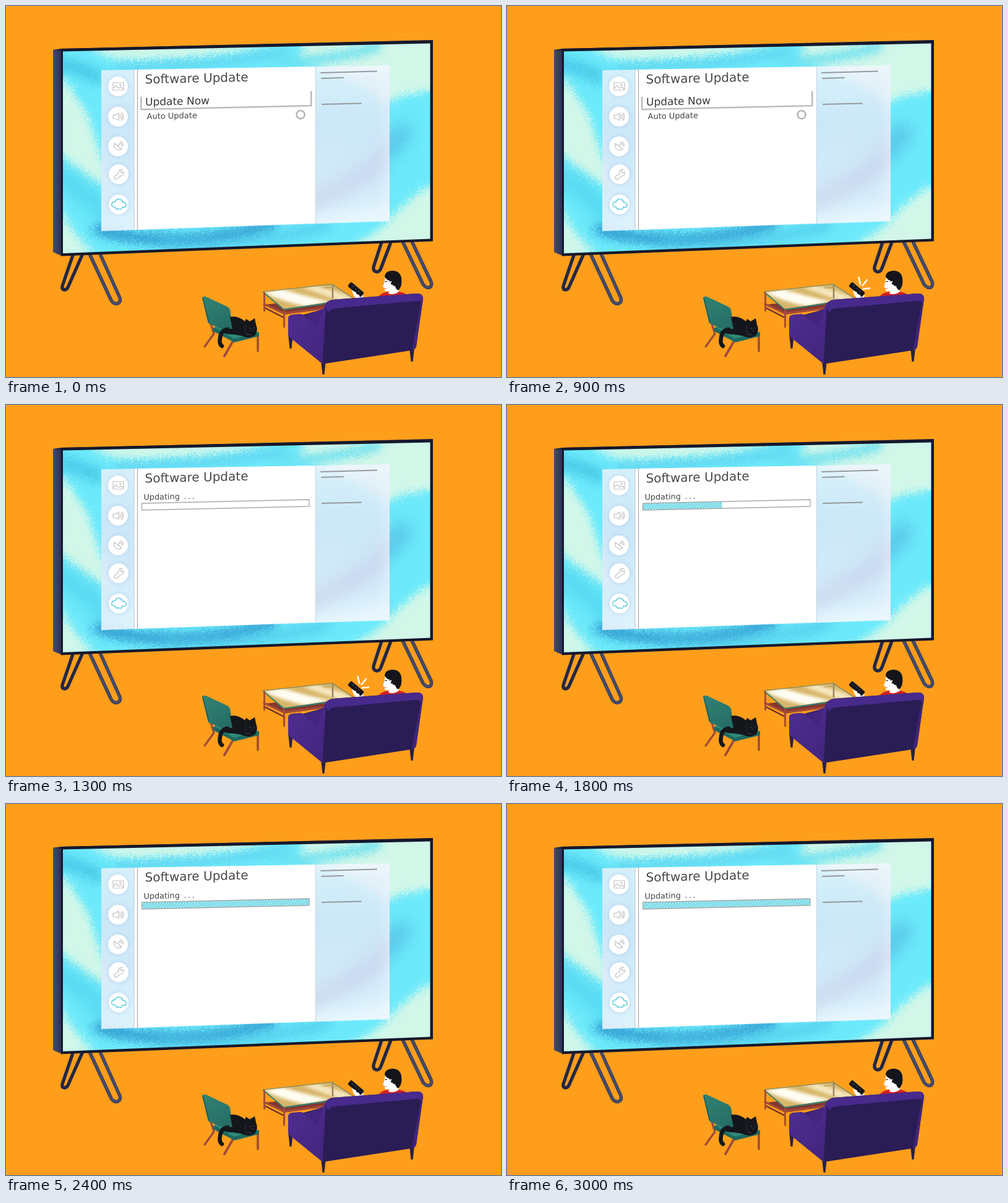
Write an HTML page with a canvas that moves like this. It is 800 by 600 pixels and loops after 3200 ms.

```html
<!DOCTYPE html>
<html lang="en">
<head>
<meta charset="utf-8">
<title>Software Update</title>
<style>
html, body { margin: 0; width: 100%; height: 100%; overflow: hidden; background: #ff9e1b; }
canvas { display: block; width: 800px; height: 600px; }
</style>
</head>
<body>
<canvas id="stage" width="800" height="600"></canvas>
<script>
const W = 800, H = 600, LOOP = 3200;
const stage = document.getElementById('stage').getContext('2d');

function layer() {
  const c = document.createElement('canvas');
  c.width = W;
  c.height = H;
  return c.getContext('2d', { willReadFrequently: true });
}

function fill(g, d, color) {
  g.fillStyle = color;
  g.fill(new Path2D(d));
}

function line(g, d, color, width = 1) {
  g.strokeStyle = color;
  g.lineWidth = width;
  g.lineCap = g.lineJoin = 'round';
  g.stroke(new Path2D(d));
}

function ramp(g, x1, y1, x2, y2, ...colors) {
  const r = g.createLinearGradient(x1, y1, x2, y2);
  colors.forEach((c, i) => r.addColorStop(i / (colors.length - 1), c));
  return r;
}

function randomizer(seed) {
  return () => (seed = (seed * 16807) % 2147483647) / 2147483647;
}

// Scatter neighbouring pixels to get a sprayed edge.
function spray(g, x, y, w, h, reach, seed) {
  const src = g.getImageData(x, y, w, h);
  const out = g.createImageData(w, h);
  const from = new Uint32Array(src.data.buffer);
  const to = new Uint32Array(out.data.buffer);
  const rnd = randomizer(seed);
  const shift = () => Math.round((rnd() + rnd() + rnd() - 1.5) * reach);
  const clamp = (v, max) => Math.max(0, Math.min(max, v));
  for (let j = 0; j < h; j++) {
    for (let i = 0; i < w; i++) {
      to[j * w + i] = from[clamp(j + shift(), h - 1) * w + clamp(i + shift(), w - 1)];
    }
  }
  g.putImageData(out, x, y);
}

// Letters stay upright while the baseline follows the panel.
function label(g, text, x, y, size, color) {
  g.save();
  g.transform(1, -0.022, 0, 1, x, y);
  g.font = `${size}px "DejaVu Sans", sans-serif`;
  g.fillStyle = color;
  g.fillText(text, 0, 0);
  g.restore();
}

function drawWash() {
  const g = layer();
  g.fillStyle = '#6ceafb';
  g.fillRect(0, 0, W, H);
  const paint = (d, color, blur = 6) => {
    g.filter = `blur(${blur}px)`;
    fill(g, d, color);
  };
  const sweep = (d, color, width, blur = 7) => {
    g.filter = `blur(${blur}px)`;
    line(g, d, color, width);
  };
  const mint = '#d2f7e9';
  paint('M84 110 Q112 138 134 182 Q152 240 172 296 Q122 276 84 234Z', mint, 5);
  sweep('M84 92 Q118 98 150 116', '#46c6e6', 20, 8);
  paint('M136 64 L440 58 Q360 84 232 86 Q160 92 136 64Z', mint, 5);
  sweep('M180 100 Q340 97 452 74', '#62d6f0', 13, 5);
  paint('M486 54 L700 50 L700 139 Q650 136 612 158 Q560 112 470 88Z', mint, 5);
  sweep('M440 90 Q528 88 600 66', '#67dff0', 14, 6);
  sweep('M470 318 Q580 284 640 204', '#59c4e8', 30, 12);
  sweep('M84 274 Q150 312 176 360', '#5adaf2', 34, 10);
  sweep('M150 362 Q290 398 428 353', '#349ed2', 18, 6);
  sweep('M250 383 Q400 389 520 355', '#4bc4e8', 12, 8);
  paint('M700 284 Q662 300 630 334 Q598 372 552 390 L570 400 L700 400Z', mint, 5);
  paint('M80 306 Q96 360 146 402 L80 412Z', mint, 6);
  g.filter = 'none';
  spray(g, 84, 50, 612, 360, 9, 71);
  return g.canvas;
}

function drawLegs(g) {
  const pairs = [
    ['M108 403 L91 453 Q90 458 94 459 Q98 459 100 455 L123 403', '#232742'],
    ['M136 403 L170 476 Q174 483 181 481 Q186 478 184 472 L153 403', '#454c6c'],
    ['M607 382 L594 422 Q593 429 599 430 Q604 430 606 424 L622 382', '#232742'],
    ['M641 381 L674 450 Q679 457 685 455 Q689 452 687 446 L656 381', '#454c6c']
  ];
  for (const [d, color] of pairs) {
    line(g, d, '#2a2e4c', 5.4);
    line(g, d, color, 4);
  }
}

function drawTv(g) {
  drawLegs(g);
  fill(g, 'M76 71 L90 69 V404 L76 398Z', ramp(g, 76, 0, 90, 0, '#424a70', '#2c3155'));
  fill(g, 'M76 71 L90 69 L690 55 L690 57 L90 73Z', '#22263f');
  fill(g, 'M89 69 L690 55.5 V380.5 L89 404.5Z', '#15182b');
  g.save();
  g.clip(new Path2D('M92 73.5 L685.5 60.5 V376.5 L92 400Z'));
  g.drawImage(drawWash(), 0, 0);
  g.restore();
}

const icons = [
  [181, 130, 'M-8 -6 H9 V6 H-8Z M-8 3 L-3 -1 L1 3 L5 1 L9 5 M3 -3 h2 v1.5 h-2Z'],
  [181, 179, 'M-8 -2.5 H-4 L1 -6 V6 L-4 3 H-8Z M3 -3 Q5 0 3 3 M5 -5 Q9 0 5 5.5 M7 -6 Q11 0 7 6'],
  [181, 227, 'M-6 -5 Q-8 3 -1 5.5 Q3 7 6 4 L-6 -5Z M0 -1 L4 -5 M2 -6 Q6 -5 6 -1 M4 -8 Q9 -6 8 0'],
  [182, 272, 'M-7 4 L0 -1 Q-1 -8 6 -8 L3 -4 L5 -2 L8 -4 Q9 3 3 3 L-3 8 Q-8 9 -7 4Z'],
  [182, 321, 'M-6 4 Q-13 4 -11 -1 Q-10 -5 -6 -4 Q-3 -11 3 -8 Q6 -7 6 -4 Q13 -3 12 2 Q11 6 6 4 Q5 10 0 7 Q-4 9 -6 4Z']
];

function drawPanel(g) {
  const whole = new Path2D('M154 104 L620 96 V348 L154 364Z');
  g.fillStyle = ramp(g, 0, 96, 0, 362, 'rgba(236,244,252,.84)', 'rgba(216,231,247,.88)', 'rgba(222,234,249,.88)', 'rgba(242,247,254,.86)');
  g.fill(whole);
  g.save();
  g.clip(whole);
  g.filter = 'blur(12px)';
  line(g, 'M490 318 Q570 292 630 228', 'rgba(200,207,233,.6)', 26);
  line(g, 'M500 362 L630 334', 'rgba(248,251,255,.6)', 24);
  line(g, 'M500 98 L624 92 V350', 'rgba(248,251,255,.6)', 16);
  g.restore();
  fill(g, 'M207 103 L500 98 V351 L207 362Z', '#fff');
  line(g, 'M207 103 V362', '#c9ced6', 1.2);
  line(g, 'M212.5 103 V362', '#a9adb3', 1.3);
  line(g, 'M500.5 98 V351', '#c6d2de', 1);

  icons.forEach(([x, y, d], i) => {
    g.save();
    g.translate(x, y);
    g.shadowColor = 'rgba(150,180,222,.5)';
    g.shadowBlur = 7;
    g.fillStyle = '#fff';
    g.beginPath();
    g.arc(0, 0, 16, 0, Math.PI * 2);
    g.fill();
    g.shadowBlur = 0;
    line(g, d, i === 4 ? '#55c9dc' : '#c2c2c2', i === 4 ? 1.4 : 1.2);
    g.restore();
  });

  line(g, 'M509 108 L599 105.5', '#969a9e', 2);
  line(g, 'M510 117 L545 116', '#969a9e', 2);
  line(g, 'M511 159 L574 157.5', '#969a9e', 2);
  label(g, 'Software Update', 224.5, 125.5, 20, '#484848');
}

function drawTable(g) {
  fill(g, 'M418 483 L450 499 L522 489 L545 478 L500 474Z', '#85362e');
  line(g, 'M417 482 L449 497 L520 488', '#a54a37', 3.4);
  line(g, 'M418 488 L449 504', '#6c3029', 2.4);
  fill(g, 'M416 462 L527 450 L562 473 L449 490Z', '#d7b66a');
  g.save();
  g.clip(new Path2D('M416 462 L527 450 L562 473 L449 490Z'));
  g.filter = 'blur(2.5px)';
  fill(g, 'M416 463 L446 458 Q486 470 524 478 L486 486 Q446 478 416 463Z', '#fffdf2');
  fill(g, 'M478 455 L500 452 Q532 460 562 472 L540 477 Q508 466 478 455Z', '#f5e6bd');
  g.filter = 'none';
  g.restore();
  line(g, 'M528 452 V472', '#9a8662', 2.6);
  line(g, 'M513 456 L530 455', '#b8a46d', 1.3);
  line(g, 'M416 462 L527 450 L562 473', '#66866a', 1.1);
  line(g, 'M416 463 L449 491 L518 481', '#2e8172', 1.8);
  line(g, 'M417.5 464 V493', '#a34b38', 2.8);
  line(g, 'M449.5 492 V519', '#a34b38', 3);
}

function drawChair(g) {
  const wood = '#9d4b3c';
  line(g, 'M330 511 L336 530 L321 551', wood, 3.2);
  line(g, 'M368 540 L353 566', wood, 3.8);
  line(g, 'M407 532 V558', wood, 3.6);
  fill(g, 'M334 521 L364 514 L409 528 V534 L369 544 L335 526Z', '#1e6a60');
  fill(g, 'M336 519 L370 514 L409 528 L368 538Z', '#2f8a7b');
  fill(g, 'M317 472 Q318 469 323 470 L357 486 Q361 488 362 491 L367 525 Q367 530 362 528 L331 515 Q327 514 326 510Z',
    ramp(g, 322, 470, 362, 528, '#318273', '#246a63'));
  line(g, 'M318 472 L328 512', '#1f5b57', 1.6);
}

function drawCat(g) {
  line(g, 'M358 523 Q347 525 346 537 Q344 546 349 550', '#15171d', 6.6);
  fill(g, 'M362 503 Q374 500 386 510 L388 506 L394 510 L402 505 L404 515 Q408 525 403 532 Q397 537 389 536 Q378 532 366 531 Q350 531 349 524 Q355 523 366 522Z', '#14161b');
  line(g, 'M388 516 Q385 525 389 530', '#343842', 0.8);
  line(g, 'M393 521 l3 1 M400 521 l2 -1 M397 525 h2 M389 532 Q393 529 396 533', '#535966', 0.8);
}

function drawMan(g) {
  fill(g, 'M601 471 Q607 463 618 462 L636 462 Q646 464 648 469 L648 475 L601 475Z', '#d22124');
  fill(g, 'M613 438 L611 448 L609 454 L612 456 L612 460 Q614 463 619 461 L618 465 Q627 468 635 462 L634 440Z', '#fff');
  fill(g, 'M612 438 Q612 429 624 428 Q637 428 639 440 Q641 453 634 460 Q630 458 629 453 Q625 453 624 450 Q619 452 620 444 Q616 444 612 438Z', '#14151b');
  line(g, 'M622 446 Q619 449 622 453', '#fff', 2.4);
  line(g, 'M612.5 446 l3 -.6', '#25242a', 1.1);
  line(g, 'M612 457 l3 0', '#d85d55', 0.8);
  fill(g, 'M559 458 Q564 455 567 462 L577 467 Q579 470 575 473 L565 472 Q560 467 559 458Z', '#fff');
  g.save();
  g.translate(565.5, 458.5);
  g.rotate(0.7);
  g.fillStyle = '#15171d';
  g.beginPath();
  g.roundRect(-14, -4.5, 28, 9, 2);
  g.fill();
  line(g, 'M-9 -1 h3 M-2 -1 h2 M4 -1 h2', '#4d515b', 1);
  g.restore();
  line(g, 'M561 462 l4 2 M566 467 l4 1', '#fff', 2.2);
}

function drawSofa(g) {
  const foot = (x, y, h) => fill(g, `M${x - 4} ${y} h8 l-2.5 ${h} h-3Z`, '#292044');
  foot(460, 530, 24);
  foot(513, 573, 23);
  foot(656, 553, 22);
  fill(g, 'M478 500 L514 490 L514 535 L496 525Z', '#362064');
  fill(g, 'M456 505 Q456 500 463 499 L475 498 Q480 498 483 502 L502 517 L515 484 Q518 477 526 476 L531 482 L516 577 Q512 580 508 576 L460 537 Q456 534 456 529Z',
    ramp(g, 456, 500, 525, 565, '#4e2d90', '#42247d'));
  fill(g, 'M483 501 L512 490 L502 518Z', '#43257f');
  fill(g, 'M517 484 Q519 477 527 475 L663 465 Q674 464 674 474 L663 550 Q662 556 655 557 L518 578 Q510 579 512 570Z', '#2a1d55');
  fill(g, 'M516 486 Q520 476 528 475 L663 465 Q674 464 674 473 L672 482 Q670 476 661 477 L531 489 Q523 490 521 496Z', '#482a8c');
  fill(g, 'M674 472 L663 551 Q661 556 656 557 L671 477Z', '#40257a');
}

function drawScene() {
  const g = layer();
  g.fillStyle = '#ff9e1b';
  g.fillRect(0, 0, W, H);
  drawTv(g);
  drawPanel(g);
  drawTable(g);
  drawChair(g);
  drawCat(g);
  drawMan(g);
  drawSofa(g);
  return g.canvas;
}

function drawMenu(g) {
  line(g, 'M219 148 V168 L494 162 V139', '#dedede', 2);
  line(g, 'M218 147 V167 L493 161 V138', '#aaa', 1.5);
  label(g, 'Update Now', 225, 161, 17, '#3a3a3a');
  label(g, 'Auto Update', 227.5, 183, 13, '#444');
  g.strokeStyle = '#b4b4b4';
  g.lineWidth = 2.4;
  g.beginPath();
  g.arc(476, 175.7, 6.6, 0, Math.PI * 2);
  g.stroke();
}

function drawProgress(g, part) {
  label(g, 'Updating\u2009 .\u2009.\u2009.', 222.5, 153.5, 12.8, '#444');
  const bar = 'M219.5 159 L490 153 V164 L219.5 170Z';
  if (part > 0) {
    const end = 219.5 + 270.5 * part;
    g.save();
    g.clip(new Path2D(bar));
    g.beginPath();
    g.rect(219, 150, end - 219, 22);
    g.clip();
    fill(g, bar, '#9ce9f3');
    for (let x = 212; x < end + 8; x += 4.6) {
      line(g, `M${x} 172 l13 -20`, '#65cbda', 1.1);
    }
    g.restore();
  }
  line(g, bar, '#aaa', 1.4);
}

function drawSparks(g) {
  line(g, 'M568.5 439 L571 450 M582 443 L574.5 452 M586 456.5 L575.5 457.5', '#fff', 2.6);
}

const steps = [[2400, 1], [2100, 0.742], [1800, 0.473], [1500, 0.2], [1300, 0]];
const flashes = [500, 900, 1300];
const scene = drawScene();
const start = performance.now();

function frame() {
  const t = Math.max(0, performance.now() - start) % LOOP;
  stage.drawImage(scene, 0, 0);
  const step = steps.find(([at]) => t >= at);
  if (step) drawProgress(stage, step[1]);
  else drawMenu(stage);
  if (flashes.some(at => t >= at && t < at + 200)) drawSparks(stage);
  requestAnimationFrame(frame);
}
frame();
</script>
</body>
</html>
```
